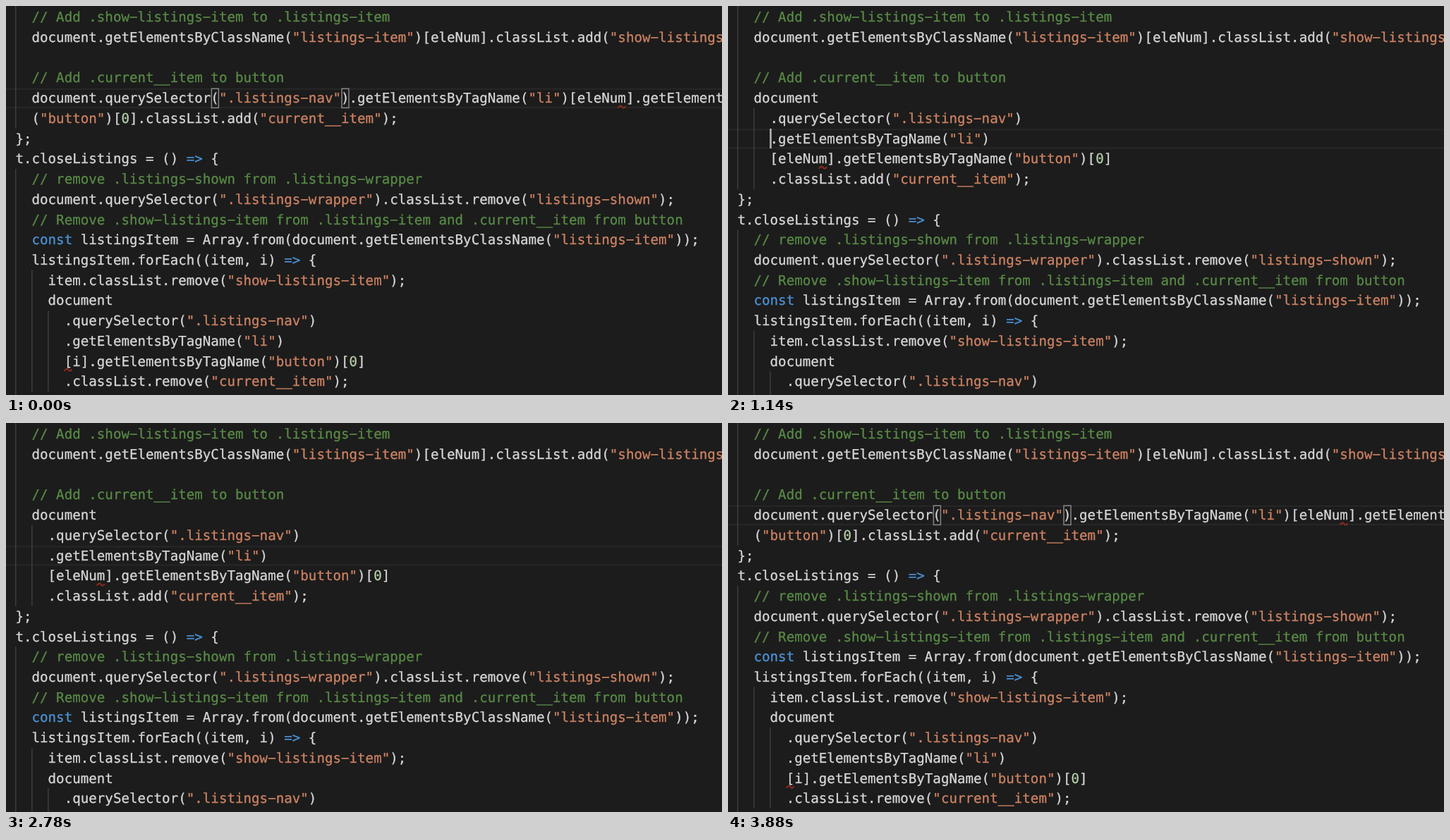
Recreate the animation shown at these times as an HTML page with a canvas. Size 1015x552 px, loop 3900 ms.

```html
<!DOCTYPE html>
<html lang="en">
<head>
<meta charset="utf-8">
<title>Code formatting</title>
<style>
  html, body { margin: 0; width: 100%; height: 100%; overflow: hidden; background: #1c1c1c; }
  canvas { display: block; }
</style>
</head>
<body>
<canvas id="stage" width="1015" height="552"></canvas>
<script>
const ctx = document.getElementById("stage").getContext("2d");
const W = 1015, H = 552, LOOP = 3900;
const LEFT = 13.4, COL = 11.54, TOP = 1.4, ROW = 28.72, BASE = 20.9;

const COLORS = {
  back: "#1c1c1c", line: "#272727", guide: "#3d3d3d", plain: "#d6d6d6",
  comment: "#588a46", string: "#cd8262", keyword: "#4a92d6", number: "#b5cea8",
  error: "#8e2c1c", caret: "#b4b4b2", bracket: "#858585"
};

const HEAD = [
  "  // Add .show-listings-item to .listings-item",
  '  document.getElementsByClassName("listings-item")[eleNum].classList.add("show-listings-item");',
  "",
  "  // Add .current__item to button"
];
const WRAPPED = [
  '  document.querySelector(".listings-nav").getElementsByTagName("li")[eleNum].getElementsByTagName',
  '  ("button")[0].classList.add("current__item");'
];
const CHAINED = [
  "  document",
  '    .querySelector(".listings-nav")',
  '    .getElementsByTagName("li")',
  '    [eleNum].getElementsByTagName("button")[0]',
  '    .classList.add("current__item");'
];
const TAIL = [
  "};",
  "t.closeListings = () => {",
  "  // remove .listings-shown from .listings-wrapper",
  '  document.querySelector(".listings-wrapper").classList.remove("listings-shown");',
  "  // Remove .show-listings-item from .listings-item and .current__item from button",
  '  const listingsItem = Array.from(document.getElementsByClassName("listings-item"));',
  "  listingsItem.forEach((item, i) => {",
  '    item.classList.remove("show-listings-item");',
  "    document",
  '      .querySelector(".listings-nav")',
  '      .getElementsByTagName("li")',
  '      [i].getElementsByTagName("button")[0]',
  '      .classList.remove("current__item");',
  "  });"
];

// Guides: [column, first row, row after last]; errors and brackets: [column, row]
const WRAPPED_VIEW = {
  lines: [...HEAD, ...WRAPPED, ...TAIL],
  guides: [[0, -1, 6], [0, 8, 20], [2, 13, 19], [4, 15, 19]],
  errors: [[74, 4], [6, 17]],
  caret: [41, 4],
  brackets: [[24, 4], [40, 4]]
};
const CHAINED_VIEW = {
  lines: [...HEAD, ...CHAINED, ...TAIL],
  guides: [[0, -1, 9], [2, 5, 9], [0, 11, 20], [2, 16, 20], [4, 18, 20]],
  errors: [[10, 7]],
  caret: [4, 6],
  brackets: []
};

const FORMAT = 530, UNDO = 2810;
const CARET_ON = [[240, 1200], [1800, 2400], [UNDO, 3400]];
const BRACKETS_OFF = [UNDO, 2900];

const x = col => LEFT + col * COL;
const y = row => TOP + row * ROW;
const within = (t, [from, to]) => t >= from && t < to;

const TOKEN = /(\/\/.*)|("[^"]*")|(\bconst\b|=>)|(\b\d+\b)|[^]/g;
const KINDS = ["comment", "string", "keyword", "number"];

function drawLine(text, row) {
  for (const m of text.matchAll(TOKEN)) {
    const kind = KINDS.find((_, i) => m[i + 1]) || "plain";
    ctx.fillStyle = ctx.strokeStyle = COLORS[kind];
    [...m[0]].forEach((ch, i) => {
      if (ch === " ") return;
      const glyph = ch === "-" ? "\u2212" : ch; // wide hyphen
      const px = x(m.index + i), py = y(row) + BASE;
      ctx.fillText(glyph, px, py);
      ctx.strokeText(glyph, px, py);
    });
  }
}

function drawError([col, row]) {
  const px = x(col), py = y(row) + BASE + 6;
  ctx.strokeStyle = COLORS.error;
  ctx.lineWidth = 2;
  ctx.beginPath();
  ctx.moveTo(px, py + 1.5);
  ctx.quadraticCurveTo(px + 3.5, py - 4, px + 6.5, py + 0.5);
  ctx.quadraticCurveTo(px + 8.5, py + 3, px + 11, py - 1);
  ctx.stroke();
}

function drawBracket([col, row]) {
  ctx.strokeStyle = COLORS.bracket;
  ctx.lineWidth = 1.5;
  ctx.strokeRect(x(col) + 1, y(row) + 1, COL - 1.5, ROW - 1.5);
}

function draw(t) {
  const view = within(t, [FORMAT, UNDO]) ? CHAINED_VIEW : WRAPPED_VIEW;
  const [caretCol, caretRow] = view.caret;

  ctx.fillStyle = COLORS.back;
  ctx.fillRect(0, 0, W, H);

  ctx.fillStyle = COLORS.line;
  ctx.fillRect(0, y(caretRow) + 0.6, W, 2);
  ctx.fillRect(0, y(caretRow + 1) - 2, W, 2);

  ctx.fillStyle = COLORS.guide;
  for (const [col, from, to] of view.guides) {
    ctx.fillRect(x(col) - 0.4, y(from), 1.5, (to - from) * ROW);
  }

  ctx.font = '19.17px "DejaVu Sans Mono", monospace';
  ctx.lineWidth = 0.3;
  view.lines.forEach(drawLine);
  view.errors.forEach(drawError);
  if (!within(t, BRACKETS_OFF)) view.brackets.forEach(drawBracket);

  if (CARET_ON.some(span => within(t, span))) {
    ctx.fillStyle = COLORS.caret;
    ctx.fillRect(x(caretCol) - 0.4, y(caretRow) + 0.3, 2.6, ROW - 0.6);
  }
}

ctx.textRendering = "geometricPrecision";
const start = performance.now();
function tick() {
  draw((performance.now() - start) % LOOP);
  requestAnimationFrame(tick);
}
tick();
</script>
</body>
</html>
```
